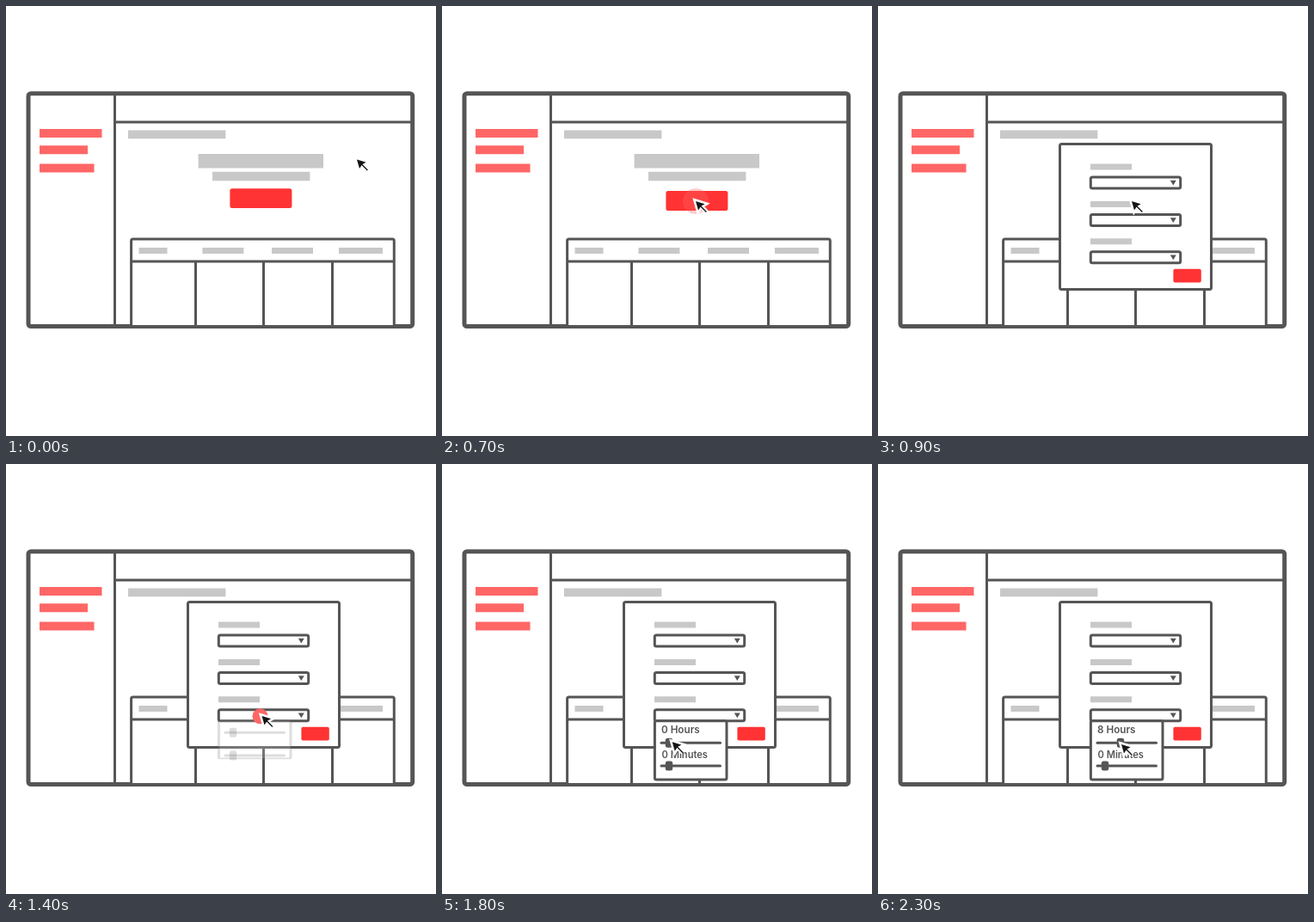
These frames come from a looping animation (500 by 500 pixels, 3000 ms). An HTML page with a canvas:

```html
<!DOCTYPE html>
<html lang="en">
<head>
<meta charset="utf-8">
<title>Scheduling dialog</title>
<style>
  html, body { margin: 0; width: 100%; height: 100%; overflow: hidden; background: #fff; }
  canvas { display: block; width: 500px; height: 500px; }
</style>
</head>
<body>
<canvas id="stage" width="500" height="500"></canvas>
<script>
const ctx = document.getElementById('stage').getContext('2d');
const LOOP = 3000, STEP = 20;
const LINE = '#555', GREY = '#c8c8c8', RED = '#f33', SOFT_RED = '#f66';

// Linear progress through a time span, clamped to 0..1
const span = (t, from, to) => Math.min(1, Math.max(0, (t - from) / (to - from)));
const mix = (a, b, p) => a + (b - a) * p;

function bar(x, y, w, h, color, radius = 0) {
  ctx.fillStyle = color;
  ctx.beginPath();
  ctx.roundRect(x, y, w, h, radius);
  ctx.fill();
}

function box(left, top, right, bottom, width = 3, radius = 2) {
  ctx.beginPath();
  ctx.roundRect(left, top, right - left, bottom - top, radius);
  ctx.fillStyle = '#fff';
  ctx.fill();
  ctx.strokeStyle = LINE;
  ctx.lineWidth = width;
  ctx.stroke();
}

function line(x1, y1, x2, y2, cap = 'butt') {
  ctx.strokeStyle = LINE;
  ctx.lineWidth = 3;
  ctx.lineCap = cap;
  ctx.beginPath();
  ctx.moveTo(x1, y1);
  ctx.lineTo(x2, y2);
  ctx.stroke();
}

function scaled(cx, cy, sx, sy, paint) {
  ctx.save();
  ctx.translate(cx, cy);
  ctx.scale(sx, sy);
  ctx.translate(-cx, -cy);
  paint();
  ctx.restore();
}

function drawPage(t) {
  box(26, 101.7, 472.7, 372.5, 5, 3);
  line(126.5, 102, 126.5, 372);
  line(126, 135, 472, 135);

  bar(39, 143, 72.5, 10, SOFT_RED);
  bar(39, 162.3, 56, 10, SOFT_RED);
  bar(39, 183.4, 63.5, 10, SOFT_RED);

  bar(142, 144.4, 113.4, 9.8, GREY);
  bar(223.6, 172, 145.4, 16.6, GREY);
  bar(240, 192.8, 113.4, 10.4, GREY);

  const press = span(t, 500, 600) - span(t, 700, 800);
  bar(260.4, 212.3 + 2.8 * press, 72, 22.8, RED, 2.5);

  box(145.6, 271, 451.3, 372.5, 3, 2);
  line(145, 297, 452, 297);
  for (const x of [220.5, 299.5, 379.5]) line(x, 297, x, 372);
  for (const [x, w] of [[154.5, 33], [228.4, 48], [309, 48], [387, 51]]) {
    bar(x, 281, w, 7, GREY);
  }
  line(124, 372.5, 472, 372.5);
}

function drawField(y) {
  bar(247, y - 22, 48, 7, GREY);
  box(247.3, y - 6.5, 351.7, y + 6.5);
  ctx.fillStyle = LINE;
  ctx.beginPath();
  ctx.moveTo(339.8, y - 2.7);
  ctx.lineTo(346.8, y - 2.7);
  ctx.lineTo(343.3, y + 3);
  ctx.fill();
}

function drawDialog(t) {
  const alpha = span(t, 720, 880);
  if (!alpha) return;
  const size = mix(1.1, 1, span(t, 740, 900) ** 2);
  ctx.globalAlpha = alpha;
  scaled(247, 249, size, size, () => {
    box(211.5, 160.5, 387.5, 329.5);
    for (const y of [205.5, 249, 292.3]) drawField(y);
  });
  scaled(359.6, 313.7, size, size, () => bar(343.4, 305.8, 32.4, 15.8, RED, 2));
  ctx.globalAlpha = 1;
}

function drawSlider(y, knobX) {
  line(255, y, 323.5, y, 'round');
  bar(knobX - 4.2, y - 5.5, 8.4, 11, LINE, 2.5);
}

function label(text, x, y, size) {
  ctx.font = `600 ${size}px Inter, sans-serif`;
  ctx.fillStyle = LINE;
  ctx.fillText(text, x, y);
}

function drawDropdown(t, drag) {
  const open = span(t, 1360, 1560);
  if (!open) return;
  const shift = -15 * (1 - open);
  ctx.globalAlpha = open;
  scaled(247, 298.7, 1, mix(0.55, 1, open), () => box(247.4, 298.7, 331, 367));
  drawSlider(324.2 + shift, mix(264, 282, drag));
  drawSlider(351 + shift, 264);
  ctx.globalAlpha = span(t, 1440, 1560);
  label(Math.floor(drag * 8) + ' Hours', 255, 313.2 + shift, 11.7);
  label('0 Minutes', 255.6, 342.2 + shift, 11.1);
  ctx.globalAlpha = 1;
}

function drawRipple(t, start, x, y) {
  const p = span(t, start, start + 240);
  if (p <= 0 || p >= 1) return;
  ctx.globalAlpha = Math.min(1, 2 - 2 * p);
  ctx.fillStyle = SOFT_RED;
  ctx.beginPath();
  ctx.arc(x, y, 18 * p, 0, Math.PI * 2);
  ctx.fill();
  ctx.globalAlpha = 1;
}

function cursorAt(t) {
  const stops = [
    [0, 408, 178.5], [300, 295, 227], [1000, 295, 227], [1280, 297.5, 293],
    [1580, 297.5, 293], [1820, 265, 326], [2300, 283, 326]
  ];
  const next = stops.findIndex(([time]) => time > t);
  if (next < 0) return stops.at(-1).slice(1);
  const [from, x1, y1] = stops[next - 1], [to, x2, y2] = stops[next];
  const p = span(t, from, to);
  return [mix(x1, x2, p), mix(y1, y2, p)];
}

function drawCursor(x, y) {
  const head = new Path2D('M0 0L10.6 3.2L6.2 5.8L3 10.6Z');
  const tail = new Path2D('M5 5L12.4 12.4');
  ctx.save();
  ctx.translate(x, y);
  ctx.lineCap = 'butt';
  ctx.strokeStyle = '#fff';
  ctx.lineWidth = 5;
  ctx.stroke(head);
  ctx.lineWidth = 5.5;
  ctx.stroke(tail);
  ctx.fillStyle = ctx.strokeStyle = '#151515';
  ctx.fill(head);
  ctx.lineWidth = 1.4;
  ctx.stroke(tail);
  ctx.restore();
}

function draw(t) {
  ctx.fillStyle = '#fff';
  ctx.fillRect(0, 0, 500, 500);
  drawPage(t);
  drawDialog(t);
  drawDropdown(t, span(t, 1820, 2300));
  drawRipple(t, 500, 295, 227);
  drawRipple(t, 1280, 295.5, 293.3);
  drawCursor(...cursorAt(t));
}

const start = performance.now();
function tick() {
  const elapsed = (performance.now() - start) % LOOP;
  draw(Math.floor(elapsed / STEP) * STEP);
  requestAnimationFrame(tick);
}
tick();
</script>
</body>
</html>
```
